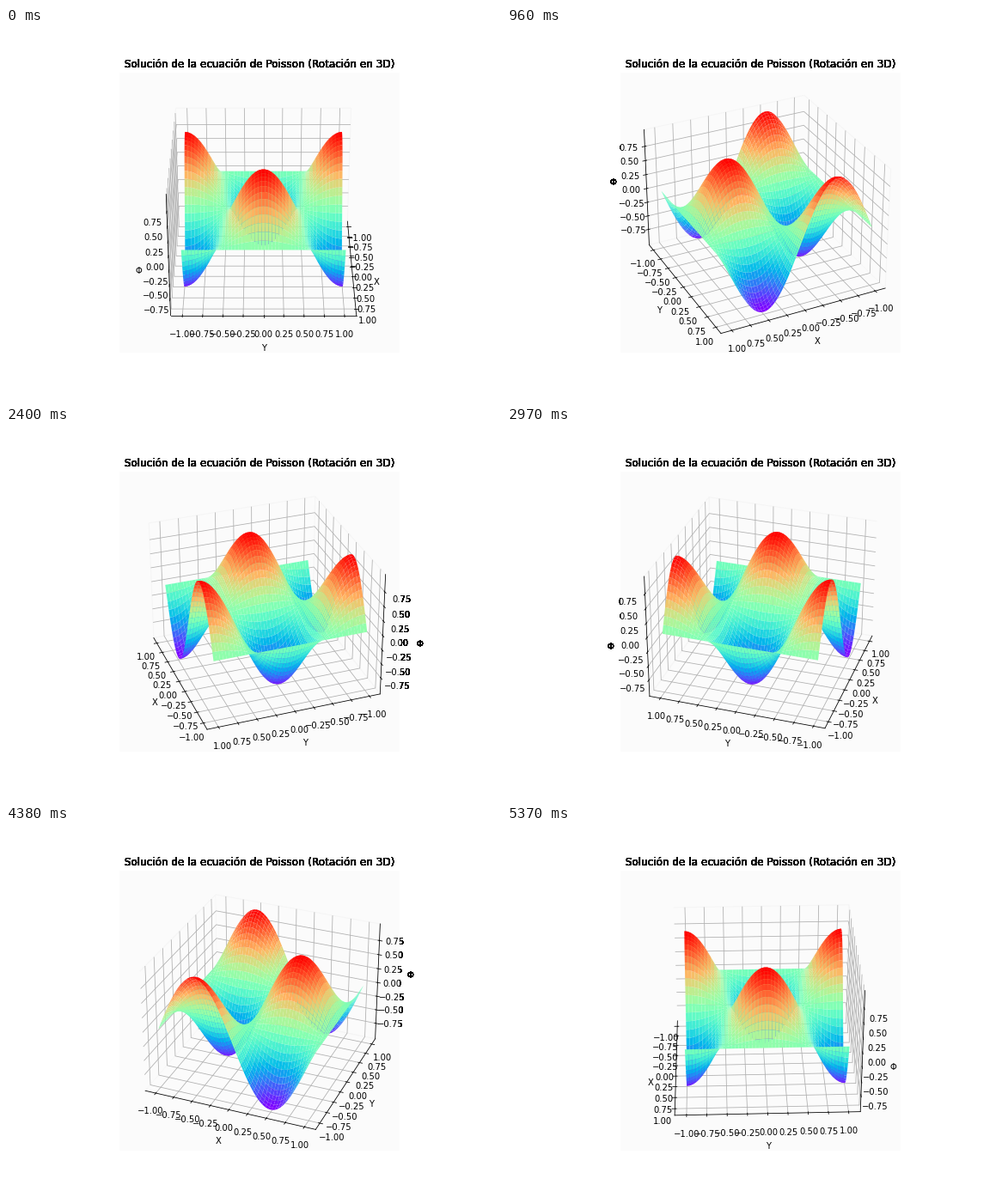
Animation of 576x432 px, one loop 5400 ms. Source, as a matplotlib script:

```python
import numpy as np
import matplotlib.pyplot as plt
from matplotlib.animation import FuncAnimation
from matplotlib.artist import Artist
from matplotlib.transforms import Bbox

W, H, DPI = 576, 432, 72
FRAMES, INTERVAL = 180, 30
BACK = "#fbfbfb"

plt.rcParams.update({"font.family": "DejaVu Sans", "font.size": 10})

fig = plt.figure(figsize=(W / DPI, H / DPI), dpi=DPI, facecolor="white")
fig.subplots_adjust(left=0.125, right=0.9, bottom=0.125, top=0.88)
ax = fig.add_subplot(projection="3d", facecolor=BACK)

x, y = np.meshgrid(np.linspace(-1, 1, 50), np.linspace(-1, 1, 50))
phi = np.sin(np.pi * x) * np.cos(np.pi * y)
ax.plot_surface(x, y, phi, cmap="rainbow", edgecolor="none", rcount=50, ccount=50)

title = ax.set_title("Solución de la ecuación de Poisson (Rotación en 3D)", y=1)
title.set_y(1)  # 3D axes lower their titles by default
ax.set(xlabel="X", ylabel="Y", zlabel="Φ")

ticks = np.linspace(-1, 1, 9)
ax.set_xticks(ticks)
ax.set_yticks(ticks)
ax.set_zticks(ticks[1:-1])
pad = 25 / 24
side = 1.1 * pad
top = np.abs(phi).max() * pad
ax.set_xlim(-side, side, view_margin=0)
ax.set_ylim(-side, side, view_margin=0)
ax.set_zlim(-top, top, view_margin=0)

axes3 = (ax.xaxis, ax.yaxis, ax.zaxis)
for axis in axes3:
    axis.set_pane_color(BACK)
    axis.pane.set_edgecolor("0.96")


class HardText(Artist):
    """Darkens the antialiased edges of text lying outside the axes patch."""

    def draw(self, renderer):
        l, b, r, t = ax.bbox.extents.round()
        strips = [Bbox.from_extents(*e) for e in (
            (0, 0, l, H), (r, 0, W, H), (l, t, r, H), (l, 0, r, b))]
        texts = [title]
        for axis in axes3:
            texts.append(axis.label)
            texts += [tick.label1 for tick in axis.get_major_ticks()]
        for text in texts:
            box = text.get_window_extent(renderer)
            for strip in strips:
                if not box.overlaps(strip):
                    continue
                text.set_clip_box(strip)
                text.set_clip_on(True)
                for _ in range(12):
                    text.draw(renderer)
                text.set_clip_on(False)


hard = HardText()
hard.set_zorder(10)
fig.add_artist(hard)


def update(i):
    ax.view_init(elev=30, azim=i * 360 / FRAMES)


anim = FuncAnimation(fig, update, frames=FRAMES, interval=INTERVAL,
                     repeat=True, repeat_delay=0)
plt.show()
```
